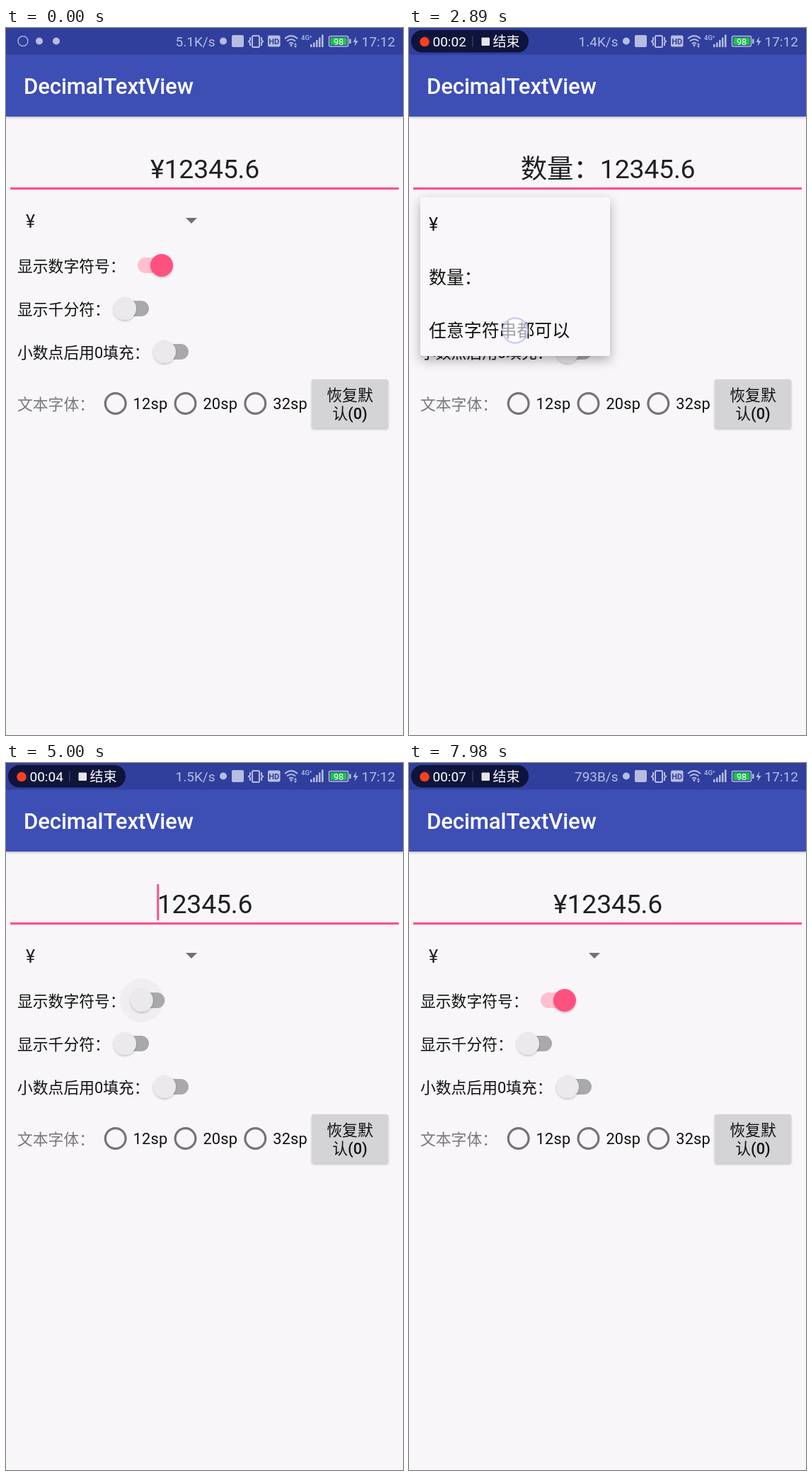
An HTML page for the animation above (8000 ms loop, 561x998 px).

```html
<!DOCTYPE html>
<html lang="zh-CN">
<head>
<meta charset="utf-8">
<title>DecimalTextView</title>
<style>
  html, body { margin: 0; width: 100%; height: 100%; overflow: hidden; background: #f8f6f9; }
  svg { display: block; width: 561px; height: 998px; }
  text {
    font-family: Roboto, "Noto Sans CJK SC DemiLight", "Noto Sans CJK SC Light", "Noto Sans CJK SC", "Noto Sans CJK", sans-serif;
    fill: #111; white-space: pre;
  }
  .status text { font-size: 19px; fill: #b6bde2; }
  .pill text { font-size: 19px; fill: #fff; }
  .body { font-size: 21.8px; }
  .item text { font-size: 24.9px; }
  .value text, text.value { fill: #202022; }
  .button text { font-family: Roboto, "Noto Sans CJK SC Medium", "Noto Sans CJK SC", sans-serif; font-weight: 500; text-anchor: middle; }
  #number { letter-spacing: -.2px; }
  #radios { letter-spacing: .2px; }
</style>
</head>
<body>
<svg viewBox="0 0 561 998" lang="zh-CN">
  <defs>
    <filter id="soft" x="-20%" y="-20%" width="140%" height="150%">
      <feDropShadow dx="0" dy="1.5" stdDeviation="1.5" flood-opacity=".24"/>
    </filter>
    <filter id="deep" x="-20%" y="-20%" width="140%" height="140%">
      <feDropShadow dx="0" dy="6" stdDeviation="8" flood-opacity=".3"/>
    </filter>
  </defs>
  <rect width="561" height="998" fill="#f8f6f9"/>

  <rect y="30" width="561" height="95" fill="#3c50b5" filter="url(#soft)"/>
  <text x="25" y="93" font-size="31.2" font-weight="500" letter-spacing="-.15" style="fill:#fff">DecimalTextView</text>

  <g class="status" fill="#b6bde2">
    <rect width="561" height="37.5" fill="#303f9c"/>
    <circle cx="24" cy="18.5" r="7" fill="none" stroke="#a3abd6" stroke-width="1.5"/>
    <circle cx="47" cy="18.5" r="5"/>
    <circle cx="71" cy="18.5" r="5"/>
    <text id="speed" x="295.5" y="26" text-anchor="end"></text>
    <circle cx="307" cy="18.5" r="5"/>
    <rect x="319" y="10" width="17" height="17" rx="2"/>
    <g fill="none" stroke="#b6bde2" stroke-width="2">
      <rect x="348" y="11" width="10" height="16" rx="1.5"/>
      <path d="M345 13v4l-2 2l2 2v4M361 13v4l2 2l-2 2v4"/>
      <path d="M394 15q9-8 18 0M397 18.5q6-5 12 0M400 22q3-2.5 6 0"/>
    </g>
    <rect x="370" y="10.5" width="17.5" height="16" rx="2"/>
    <text x="378.8" y="23" text-anchor="middle" style="font-size:11px;font-weight:700;fill:#303f9c">HD</text>
    <path d="M401 23h4l-2 4zM407 24l2-3l2 3zM407 25l2 3l2-3z"/>
    <text x="417" y="17" style="font-size:9.5px;font-weight:500">4G⁺</text>
    <path d="M430 23h2.5v4h-2.5zM434 20.5h2.5v6.5h-2.5zM438 17h2.5v10h-2.5zM442 13.5h2.5v13.5h-2.5zM446 9.5h2.5v17.5h-2.5z"/>
    <rect x="456.5" y="11.5" width="27" height="14.5" rx="2" fill="none" stroke="#b6bde2" stroke-width="1.5"/>
    <rect x="458.5" y="13.5" width="23" height="10.5" fill="#1fc34a"/>
    <rect x="485" y="15.5" width="2.5" height="6.5"/>
    <text x="470" y="23.5" text-anchor="middle" style="font-size:12.5px;fill:#fff">98</text>
    <path d="M495 12l-4.5 8h3.2l-1.2 6l5-8h-3.5z"/>
    <text x="502.5" y="26">17:12</text>
  </g>

  <g class="pill" id="pill">
    <rect x="3" y="3" width="166" height="31.5" rx="15.7" fill="#0b1030" opacity=".9"/>
    <circle id="dot" cx="22" cy="19.5" r="6.8" fill="#fb3f1f"/>
    <text id="clock" x="33.5" y="26"></text>
    <rect x="89.5" y="11.5" width="1" height="15" fill="#4d5270"/>
    <rect x="102.5" y="13.5" width="11.5" height="11.5" rx="1" fill="#e6e6ea"/>
    <text x="118.5" y="26">结束</text>
  </g>

  <text id="amount" class="value" x="281" y="212" font-size="37.4" text-anchor="middle"><tspan id="prefix"></tspan><tspan id="number"></tspan></text>
  <rect x="6" y="225" width="549" height="3.2" fill="#f9538a"/>
  <rect id="cursor" y="171" width="3" height="51" fill="#f9538a"/>

  <g class="item value"><text id="choice" x="28" y="281.8"></text></g>
  <path d="M254 268h16l-8 8z" fill="#707077"/>

  <g class="body">
    <text x="16" y="344">显示数字符号：</text>
    <text x="16" y="405">显示千分符：</text>
    <text x="16" y="465.5">小数点后用0填充：</text>
    <g id="switches"></g>
    <text x="16" y="539" style="fill:#77777b">文本字体：</text>
    <g id="radios"></g>
    <g class="button">
      <rect x="432" y="496" width="108" height="69" rx="2.5" fill="#d4d3d6" filter="url(#soft)"/>
      <text x="486" y="526">恢复默</text>
      <text x="486" y="551.5">认(0)</text>
    </g>
  </g>

  <g id="popup" class="item">
    <rect x="16" y="239" width="268" height="224" rx="2" fill="#f9f7fa" filter="url(#deep)"/>
    <text x="28" y="285.8">¥</text>
    <text x="28" y="361">数量：</text>
    <text x="28" y="436">任意字符串都可以</text>
  </g>
  <circle id="touch" r="17.5" fill="#fff" fill-opacity=".62" stroke="#bdbde8" stroke-opacity=".7" stroke-width="2.5"/>
</svg>

<script>
const LOOP = 8000, SLIDE = 250;
const $ = id => document.getElementById(id);
const clamp = v => Math.max(0, Math.min(1, v));
const ease = v => (1 - Math.cos(Math.PI * clamp(v))) / 2;

function add(parent, tag, attrs) {
  const el = document.createElementNS('http://www.w3.org/2000/svg', tag);
  set(el, attrs);
  parent.append(el);
  return el;
}
function set(el, attrs) {
  for (const k in attrs) el.setAttribute(k, attrs[k]);
}
function write(el, s) {
  if (el.textContent !== s) el.textContent = s;
}
// Latest value of a [time, value] list
function at(list, t) {
  let v = list[0][1];
  for (const [start, value] of list) if (t >= start) v = value;
  return v;
}

const choices = [[0, '¥'], [1950, '数量：'], [2970, '任意字符串都可以'], [4400, '¥']];
const speeds = [[0, '5.1K/s'], [900, '1.4K/s'], [3900, '1.5K/s'], [6900, '793B/s']];
const popups = [[850, 1950], [2370, 2970], [3770, 4400]];
// Press, release, x, y
const taps = [
  [700, 800, 240, 273], [1810, 1910, 150, 352],
  [2190, 2310, 240, 274], [2830, 2930, 150, 427],
  [3600, 3710, 240, 273], [4260, 4360, 120, 278],
  [4700, 4790, 205, 336], [5380, 5460, 208, 337],
  [5860, 5940, 182, 397], [6400, 6480, 182, 397],
  [6950, 7045, 250, 447], [7390, 7475, 246, 452]
];
const toggles = [
  { x: 190, y: 335, on: true, flips: [4790, 5460] },
  { x: 168, y: 396, on: false, flips: [5940, 6480] },
  { x: 224, y: 457, on: false, flips: [7020, 7475] }
];
const edits = [...choices.slice(1).map(c => c[0]), ...toggles.flatMap(s => s.flips)].sort((a, b) => a - b);

for (const s of toggles) {
  const g = $('switches');
  s.halo = add(g, 'circle', { cy: s.y, r: 31 });
  s.track = add(g, 'rect', { y: s.y - 11, width: 45, height: 22, rx: 11 });
  s.thumb = add(g, 'circle', { cy: s.y, r: 16, filter: 'url(#soft)' });
}
['12sp', '20sp', '32sp'].forEach((label, i) => {
  const x = 154.7 + i * 98.8;
  add($('radios'), 'circle', { cx: x, cy: 530, r: 14.4, fill: 'none', stroke: '#747478', 'stroke-width': 3.2 });
  add($('radios'), 'text', { x: x + 24.9, y: 538 }).textContent = label;
});

const isOn = (s, t) => s.on !== (s.flips.filter(f => t >= f).length % 2 === 1);

function drawSwitch(s, t) {
  const on = isOn(s, t);
  const last = s.flips.filter(f => t >= f).pop() ?? -1e4;
  const p = ease((t - last) / SLIDE), pos = on ? p : 1 - p;
  const x = s.x + 30 * pos;
  const halo = s.flips.reduce((a, f) =>
    Math.max(a, clamp((t - f) / 150) * clamp((f + 450 - t) / 200)), 0);
  set(s.track, { x: s.x - 11 + 7 * pos, fill: on ? '#ffbfd0' : '#a9a8ac' });
  set(s.thumb, { cx: x, fill: on ? '#ff5180' : '#ebe9eb' });
  set(s.halo, { cx: x, fill: on ? '#ff4081' : '#000', opacity: halo * (on ? 0.07 : 0.03) });
}

function draw(t) {
  const rec = t - 300;
  $('pill').style.display = rec < 0 ? 'none' : '';
  $('dot').style.display = rec % 1000 < 500 ? 'none' : '';
  write($('clock'), '00:0' + Math.max(0, Math.floor(rec / 1000)));
  write($('speed'), at(speeds, t));

  const choice = at(choices, t);
  const [sign, comma, pad] = toggles.map(s => isOn(s, t));
  const prefix = sign ? choice : '';
  write($('choice'), choice);
  write($('prefix'), prefix);
  write($('number'), (comma ? '12,345.6' : '12345.6') + (pad ? '0' : ''));

  const edit = edits.filter(e => t >= e).pop() ?? 500;
  const open = popups.some(([a, b]) => t >= a && t < b);
  const blink = t >= edit && (t - edit) % 1000 < 500 && !open;
  $('cursor').style.display = blink ? '' : 'none';
  if (blink) set($('cursor'), { x: $('amount').getStartPositionOfChar(prefix.length).x - 0.5 });

  toggles.forEach(s => drawSwitch(s, t));

  const show = popups.reduce((a, [from, to]) =>
    Math.max(a, clamp((t - from) / 150) * clamp((to + 130 - t) / 130)), 0);
  set($('popup'), { opacity: show });

  const tap = taps.find(([a, b]) => t >= a && t < b + 60);
  $('touch').style.display = tap ? '' : 'none';
  if (tap) set($('touch'), {
    cx: tap[2], cy: tap[3],
    opacity: clamp((t - tap[0]) / 40) * clamp((tap[1] + 60 - t) / 60)
  });
}

const begin = performance.now();
function tick() {
  draw((performance.now() - begin) % LOOP);
  requestAnimationFrame(tick);
}
tick();
</script>
</body>
</html>
```
